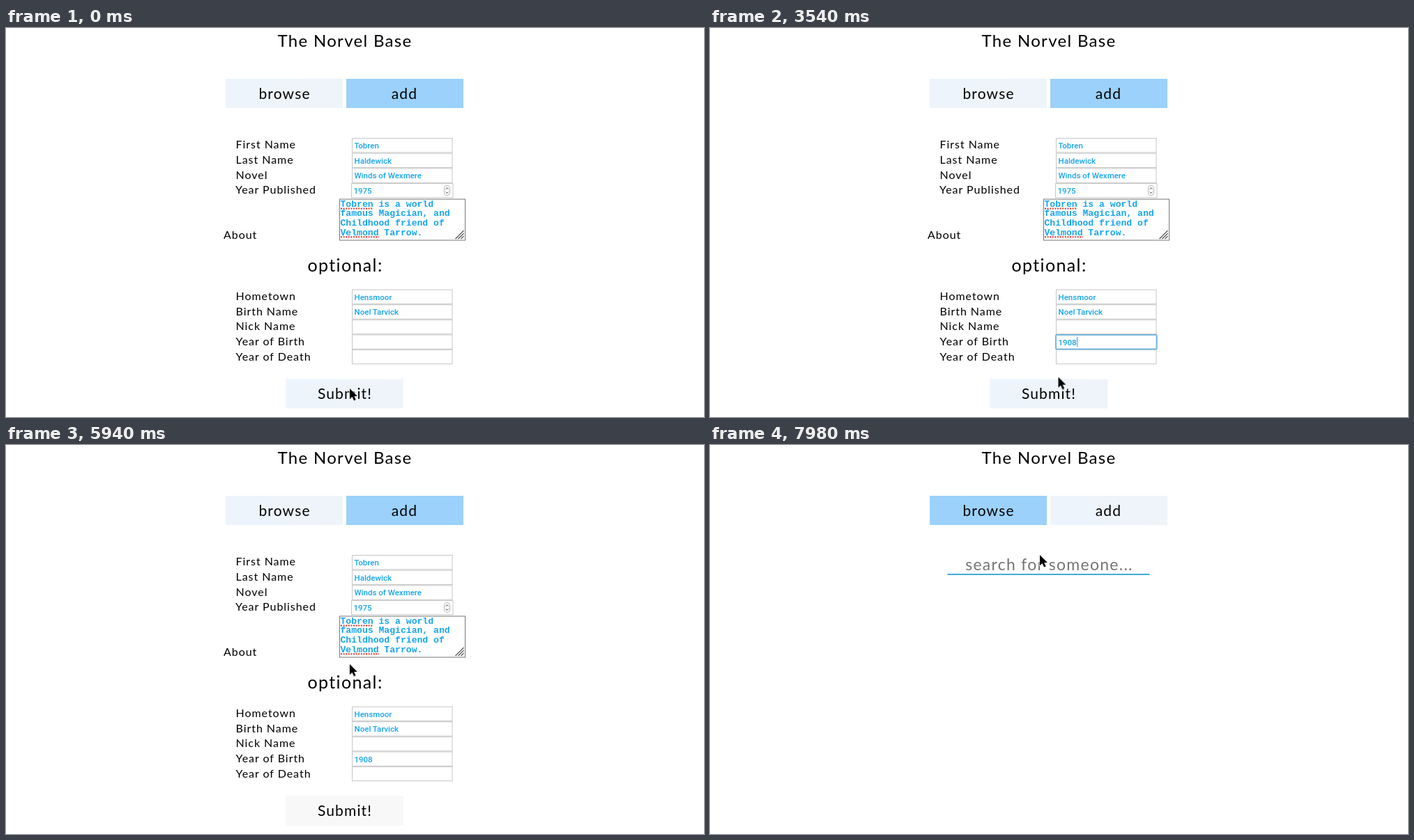
Write an HTML page that moves like this. It is 1001 by 559 pixels and loops after 8 s.

```html
<!DOCTYPE html>
<html lang="en">
<head>
<meta charset="utf-8">
<title>Character form</title>
<style>
  html, body { margin: 0; width: 100%; height: 100%; overflow: hidden; background: #fff; }
  svg { display: block; }
  text { white-space: pre; }

  .ui { font-family: Lato, sans-serif; letter-spacing: .055em; fill: #000; }
  .title { font-size: 24px; }
  .btn { font-size: 21px; }
  .head { font-size: 25px; }
  .label { font-size: 16px; letter-spacing: .06em; }
  .hint { font-size: 23px; fill: #757575; }
  .value { font: 500 11.5px Roboto, sans-serif; fill: #14a5ea; }
  .about { font: 700 13.1px "Liberation Mono", monospace; fill: #14a5ea; }
  .field { fill: #fff; stroke: #c6c6c6; }
  .typo { stroke: #d8342c; stroke-width: 2; stroke-dasharray: 2 1.6; }
  .mid { text-anchor: middle; }

  /* one loop is 8 s, so 0.75% is 60 ms */
  .anim { animation: 8s linear infinite; }
  .hard { animation-timing-function: step-end; }
  .form { animation-name: form; }
  .search { animation-name: search; }
  .ring { animation-name: ring; }
  .typed { animation-name: typed; }
  .caret { animation-name: caret; }
  .pointer { animation-name: pointer; }
  .arrow { animation-name: arrow; }
  .beam { animation-name: beam; }
  .sweep-submit { animation-name: sweep-submit; }
  .fade-submit { animation-name: fade-submit; }
  .pale-submit { animation-name: pale-submit; }
  .sweep-browse { animation-name: sweep-browse; }
  .fade-add { animation-name: fade-add; }
  .pale-add { animation-name: pale-add; }

  @keyframes form { 0% { opacity: 1 } 90%, 100% { opacity: 0 } }
  @keyframes search { 0% { opacity: 0 } 90%, 100% { opacity: 1 } }
  @keyframes ring { 0% { opacity: 0 } 10.5% { opacity: 1 } 60%, 100% { opacity: 0 } }
  @keyframes typed {
    0% { transform: translateX(0) }
    31.5% { transform: translateX(6.5px) }
    33.75% { transform: translateX(13px) }
    36% { transform: translateX(19.5px) }
    38.25%, 100% { transform: translateX(26.5px) }
  }
  @keyframes caret {
    0%, 10.49% { opacity: 0 }
    10.5%, 18.5% { opacity: 1 }
    23.25%, 27% { opacity: 0 }
    28.5%, 48% { opacity: 1 }
    51%, 52.5% { opacity: 0 }
    54.75%, 59.99% { opacity: 1 }
    60%, 100% { opacity: 0 }
  }
  @keyframes pointer {
    0%, .75% { transform: translate(493px, 518px); animation-timing-function: ease-in }
    3% { transform: translate(521px, 480px); animation-timing-function: ease-out }
    5.25% { transform: translate(549px, 434px); animation-timing-function: ease-in-out }
    7.5%, 39% { transform: translate(543px, 455px); animation-timing-function: ease-in }
    40.5% { transform: translate(526px, 482px); animation-timing-function: ease-out }
    44.25% { transform: translate(499.5px, 501.5px); animation-timing-function: ease-out }
    47.25%, 66% { transform: translate(496px, 515px) }
    69% { transform: translate(495.5px, 512px); animation-timing-function: ease-in }
    71.25% { transform: translate(495px, 498px) }
    74.25% { transform: translate(493px, 315.5px) }
    78% { transform: translate(440px, 112px); animation-timing-function: ease-out }
    81%, 92.25% { transform: translate(431px, 96px); animation-timing-function: ease-in-out }
    99%, 100% { transform: translate(473px, 158px) }
  }
  @keyframes arrow { 0% { opacity: 1 } 3% { opacity: 0 } 40.5%, 100% { opacity: 1 } }
  @keyframes beam {
    0% { opacity: 0 } 3% { opacity: 1 } 31.5% { opacity: 0 }
    39% { opacity: 1 } 40.5%, 100% { opacity: 0 }
  }
  @keyframes sweep-submit {
    0%, 44.25% { transform: translateX(168px); animation-timing-function: ease-in-out }
    54.25%, 100% { transform: translateX(-25px) }
  }
  @keyframes fade-submit { 0%, 71.25% { opacity: 1 } 73.5%, 100% { opacity: 0 } }
  @keyframes pale-submit {
    0%, 71.24% { opacity: 0 }
    71.25%, 74.25% { opacity: 1 }
    81%, 100% { opacity: 0 }
  }
  @keyframes sweep-browse {
    0%, 78% { transform: translateX(168px); animation-timing-function: ease-in-out }
    88%, 100% { transform: translateX(-25px) }
  }
  @keyframes fade-add { 0%, 90% { opacity: 1 } 92.25%, 100% { opacity: 0 } }
  @keyframes pale-add {
    0%, 89.99% { opacity: 0 }
    90%, 93% { opacity: 1 }
    99%, 100% { opacity: 0 }
  }
</style>
</head>
<body>
<svg width="1001" height="559" viewBox="0 0 1001 559">
  <defs>
    <linearGradient id="light">
      <stop stop-color="#edf4fc"/><stop offset="1" stop-color="#eff4f9"/>
    </linearGradient>
    <linearGradient id="edge">
      <stop stop-color="#eef4fb"/>
      <stop offset=".025" stop-color="#c4e2fa"/>
      <stop offset=".06" stop-color="#e2f1fd"/>
      <stop offset=".1" stop-color="#c6e4fb"/>
      <stop offset=".14" stop-color="#9bd1fa"/>
    </linearGradient>
    <clipPath id="box"><rect width="168" height="42"/></clipPath>
    <rect id="plain" width="168" height="42" fill="url(#light)"/>
    <rect id="pale" width="168" height="42" fill="#f8f8f8"/>
    <rect id="wave" width="194" height="42" fill="url(#edge)"/>
    <rect id="input" class="field" x="496.5" width="143.5" height="20.3"/>
  </defs>

  <text class="ui title mid" x="486" y="27">The Norvel Base</text>

  <g transform="translate(315 73)" clip-path="url(#box)">
    <use href="#plain"/>
    <g class="anim sweep-browse"><use href="#wave"/></g>
  </g>
  <g transform="translate(488 73)">
    <use href="#plain"/>
    <g class="anim pale-add"><use href="#pale"/></g>
    <rect class="anim fade-add" width="168" height="42" fill="#9bd1fa"/>
  </g>
  <text class="ui btn mid" x="399.5" y="102">browse</text>
  <text class="ui btn mid" x="571.5" y="102">add</text>

  <g class="anim hard form">
    <g class="ui label">
      <text x="329.5" y="173.3">First Name</text>
      <text x="329.5" y="195">Last Name</text>
      <text x="329.5" y="216.7">Novel</text>
      <text x="329" y="238.4">Year Published</text>
      <text x="312" y="303">About</text>
      <text x="329.5" y="391">Hometown</text>
      <text x="329.5" y="412.7">Birth Name</text>
      <text x="329.5" y="434.4">Nick Name</text>
      <text x="329.5" y="456">Year of Birth</text>
      <text x="329.5" y="477.5">Year of Death</text>
    </g>

    <use href="#input" y="158.5"/>
    <use href="#input" y="180.2"/>
    <use href="#input" y="201.9"/>
    <rect class="field" x="495.5" y="223.5" width="145.5" height="20.3"/>
    <use href="#input" y="376.2"/>
    <use href="#input" y="397.8"/>
    <use href="#input" y="419.4"/>
    <use href="#input" y="441"/>
    <use href="#input" y="462.4"/>

    <rect x="628.5" y="226.5" width="8" height="14" rx="3.5" fill="#fff" stroke="#b5b5b5"/>
    <path d="M630.7 231.7l1.8-2 1.8 2M630.7 235.5l1.8 2 1.8-2" fill="none" stroke="#444"/>

    <g class="value">
      <text x="499.5" y="173">Tobren</text>
      <text x="499.5" y="194.6">Haldewick</text>
      <text x="499.5" y="216.2">Winds of Wexmere</text>
      <text x="498.5" y="238">1975</text>
      <text x="499.5" y="390.5">Hensmoor</text>
      <text x="499.5" y="412.2">Noel Tarvick</text>
      <text x="499.5" y="455.5">1908</text>
    </g>
    <rect class="anim hard typed" x="499" y="443" width="40" height="16" fill="#fff"/>
    <rect class="anim hard ring" x="496" y="441" width="144.7" height="20.5" rx="1" fill="none" stroke="#78b9e1" stroke-width="2"/>
    <g class="anim hard typed">
      <rect class="anim caret" x="499.6" y="444" width="1.2" height="14" fill="#2a9fe0"/>
    </g>

    <rect x="478.5" y="246" width="180" height="59" fill="#fff" stroke="#777"/>
    <path d="M644.5 303l12-12M648.5 303l8-8M652.5 303l4-4" stroke="#555" stroke-width="1.2"/>
    <path class="typo" d="M480 259.5h47M480 300.3h55"/>
    <g class="about">
      <text x="479.5" y="256.5">Tobren is a world</text>
      <text x="479.5" y="270.2">famous Magician, and</text>
      <text x="479.5" y="283.9">Childhood friend of</text>
      <text x="479.5" y="297.6">Velmond Tarrow.</text>
    </g>

    <text class="ui head mid" x="486.5" y="350">optional:</text>

    <g transform="translate(401.5 504.5)" clip-path="url(#box)">
      <use href="#plain"/>
      <g class="anim pale-submit"><use href="#pale"/></g>
      <g class="anim fade-submit">
        <g class="anim sweep-submit"><use href="#wave"/></g>
      </g>
    </g>
    <text class="ui btn mid" x="486" y="533">Submit!</text>
  </g>

  <g class="anim hard search" opacity="0">
    <text class="ui hint mid" x="486.5" y="180">search for someone...</text>
    <rect x="340.5" y="185" width="290" height="1.8" fill="#2ba3dc"/>
  </g>

  <g class="anim pointer">
    <path class="anim hard arrow" d="M0 0V15.2L3.5 12L6.1 17.5L8.7 16.3L6.2 11H11Z" fill="#000" stroke="#fff" stroke-width="1.2" paint-order="stroke"/>
    <path class="anim hard beam" d="M-3.5-7Q0-7 0-4.5Q0-7 3.5-7M0-5V5M-3.5 7Q0 7 0 4.5Q0 7 3.5 7M-2 2.5H2" fill="none" stroke="#111" stroke-width="1.4"/>
  </g>
</svg>
</body>
</html>
```
